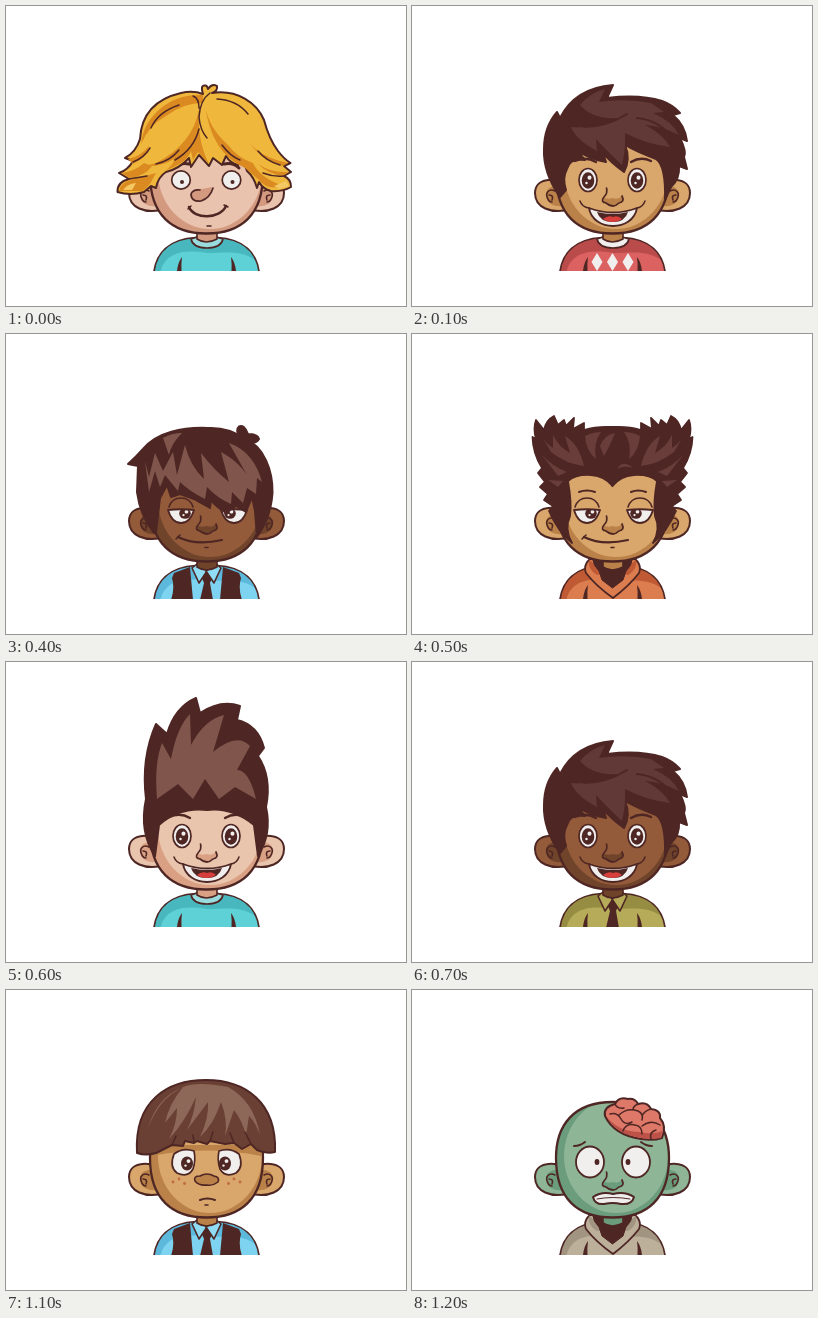
An HTML page for the animation above (1300 ms loop, 400 px wide and 300 px high).

```html
<!DOCTYPE html>
<html lang="en">
<head>
<meta charset="utf-8">
<title>Portraits</title>
<style>
html, body { margin: 0; width: 100%; height: 100%; overflow: hidden; background: #fff; }
svg { display: block; width: 100vw; height: 100vh; }
</style>
</head>
<body>
<svg id="stage" viewBox="0 0 400 300" fill="none" stroke-linejoin="round" stroke-linecap="round"></svg>
<script>
const INK = '#4e2624', WHITE = '#f1efee', STEP = 100;

const fill = (d, color) => `<path d="${d}" fill="${color}"/>`;
const line = (d, width = 1.7, color = INK) => `<path d="${d}" stroke="${color}" stroke-width="${width}"/>`;
const shape = (d, color, width = 2) => `<path d="${d}" fill="${color}" stroke="${INK}" stroke-width="${width}"/>`;
const oval = (x, y, rx, ry, color, width = 0) =>
  `<ellipse cx="${x}" cy="${y}" rx="${rx}" ry="${ry}" fill="${color}" ${width ? `stroke="${INK}" stroke-width="${width}"` : ''}/>`;
const flip = s => `<g transform="translate(401) scale(-1 1)">${s}</g>`;
const pair = s => s + flip(s);
const clip = (id, s) => `<g clip-path="url(#${id})">${s}</g>`;

const HEAD = 'M200.5 112C162 112 144 135 144 168C144 209 166 227.500 200.5 227.500C235 227.500 257 209 257 168C257 135 239 112 200.5 112Z';
const BODY = 'M147.500 270C149 246 164 233 190 231.500H211C237 233 252 246 253.500 270Z';

const skins = {
  pink: ['#e9c3ae', '#d39a80'],
  peach: ['#eac5ad', '#d9a084'],
  tan: ['#d9a76c', '#ba8148'],
  brown: ['#935b39', '#70432b'],
  green: ['#8db596', '#6b9c7c']
};

function head([skin, shade]) {
  const ear = shape('M160 182C146 170 123 171 123 187C123 201 138 209 160 203Z', skin) +
    fill('M150 181C138 177 131 185 135 194Q139 201 150 200Z', shade) +
    line('M143 185C137 182 133 187 135.500 192Q137 196 140 196M137 189Q142 189 140 194', 1.6);
  return pair(ear) + fill(HEAD, shade) +
    clip('head', oval(204, 166, 52, 57, skin)) +
    line(HEAD, 2.3);
}

// Clothes

const arms = pair(fill('M171 265Q172 256 176 251Q175 258 175.500 265Z', INK));
const roundCollar = color => shape('M185 233Q187 242 201 242Q215 242 217 233L210 231Q201 238 191 231Z', color, 1.6);
const collar = color => pair(shape('M191 230L201 237L193 249L186 234Z', color, 1.6));
const necktie = fill('M197 238H204L206 244L204 249L207 266H194L198 249L196 244Z', INK);
const torso = (color, shade) => fill(BODY, color) +
  clip('body', fill('M145 268C148 246 160 230 190 230H212C236 232 249 241 254 258C238 243 222 247 201 247C176 243 158 247 154 268Z', shade)) +
  line(BODY);

const clothes = {
  sweater: () => torso('#5dd1d5', '#49b8be') + arms + roundCollar('#9adcdd'),
  shirt: () => torso('#d8d7e1', '#bcb1d0') + arms + line('M201 239V265', 1.5) + collar('#e6e4ec') +
    [253, 261].map(y => oval(197.5, y, 1.2, 1.2, INK)).join(''),
  hoodie: (color = '#db7d4e', shade = '#bf5a35') => torso(color, shade) + arms +
    shape('M178 225Q171 231 174 239Q184 252 201 264Q217 252 227 239Q230 231 223 225Z', color, 1.8) +
    fill('M177 226Q175 235 185 241L190 240L180 228ZM224 226Q226 235 216 241L211 240L221 228Z', shade) +
    shape('M181 226Q181 231 187 237L190 246L200.5 254L211 246L214 237Q220 231 220 226Z', INK, 1),
  tie: () => torso('#b5ab59', '#968d43') + arms + necktie + collar('#b5ab59'),
  argyle: () => torso('#dc6262', '#b94b4b') + arms +
    [185, 200.5, 216].map(x => fill(`M${x} 247l5.500 9l-5.500 9l-5.500 -9Z`, WHITE)).join('') + roundCollar(WHITE),
  vest: () => torso('#7dd3f0', '#5db9dc') +
    pair(fill('M168 239L184 233L187 266H165Q169 254 166 244Z', INK)) + necktie + collar('#8fdcf4')
};

// Faces

const freckles = pair([[167, 192], [173, 189], [178.500, 193.500]]
  .map(([x, y]) => oval(x, y, 1.4, 1.4, '#bf6a3f')).join(''));
const pupil = (x, y, rx, ry = rx) => oval(x, y, rx, ry, INK) +
  oval(x + 1.5, y - ry * .35, rx * .32, rx * .32, WHITE) + oval(x - 1.5, y + ry * .3, rx * .2, rx * .2, WHITE);
const nose = shade => fill('M191 191Q195 194 201 192Q206 194 210 190Q214 196 207 197Q201 203 194 197Q188 197 191 191Z', shade) +
  line('M194.500 182Q196 187 192 191Q188 196 194 197Q201 203 207 197Q213 196 210 190', 1.7);

const faces = {
  smile: (skin, shade) => pair(line('M168 162Q174 156 183 158', 3)) +
    [175, 225.5].map(x => oval(x, 174, 9.3, 9.1, WHITE, 1.7) + oval(x + 1, 176, 2, 2, INK)).join('') +
    fill('M185 188Q188 182 196 183L206 181Q204 192 195 195Q185 196 185 188Z', shade) +
    line('M207 182Q204 192 195 195Q185 196 185 188Q187 183 194 184', 1.7) +
    line('M183 201C188 213.500 214 213.500 220 200', 2.5) +
    line('M182 203L185 200M218 199L222 201M201 220H205', 1.5),
  laugh: (skin, shade) => fill('M151 166Q201 172 250 166V174Q201 178 151 174Z', shade) +
    pupil(175, 176.5, 5.2, 6.5) + pupil(224, 176.5, 5.2, 6.5) + nose(shade) +
    shape('M178 202Q201 210 224 202C222 225 180 225 178 202Z', INK, 1.8) +
    fill('M181 204Q201 211 221 204Q220 209 216 211Q201 214 186 211Z', WHITE) +
    fill('M191 216Q197 210 201 214Q206 210 211 216Q201 221 191 216Z', '#d8373f') +
    line('M175 203Q178 203 179 200M227 203Q224 203 223 200', 1.5) + freckles,
  smirk: (skin, shade) => [[175, 179], [228, 224]].map(([x, px]) =>
      line(`M${x - 12} 173Q${x - 9} 164 ${x} 164Q${x + 9} 164 ${x + 12} 173`, 1.6) +
      fill(`M${x - 13} 176H${x + 13}Q${x + 9} 189 ${x} 189Q${x - 9} 189 ${x - 13} 176Z`, WHITE) +
      pupil(px, 179.5, 5.8, 5.2) + fill(`M${x - 12} 176Q${x} 168 ${x + 12} 176Z`, skin) +
      line(`M${x - 13} 176Q${x} 174.500 ${x + 13} 176Q${x + 9} 189 ${x} 189Q${x - 9} 189 ${x - 13} 176`, 1.8)).join('') +
    line('M167 158Q175 155 183 158M219 158Q226 155 234 158', 2) + nose(shade) +
    line('M172 203Q190 212 216 206', 2.2) + line('M170 205L174 201M199 213.500H202', 1.6),
  beam: (skin, shade) => [176, 225].map(x => oval(x, 174, 9, 11.5, WHITE, 1.7) + pupil(x, 174.5, 6.3, 8.2)).join('') +
    line('M163 155Q174 150 184 156M219 156Q229 150 239 155', 2.4) + nose(shade) +
    shape('M177 202Q201 211 225 202C221 226 181 226 177 202Z', WHITE, 1.8) +
    fill('M185 206Q201 210 216 206Q213 216 201 216Q188 216 185 206Z', INK) +
    fill('M191 213Q196 209 201 211Q206 209 210 213Q206 216 201 216Q195 216 191 213Z', '#d83f3c') +
    line('M168 195Q170 201 177 202M233 195Q231 201 225 202', 1.5),
  grumpy: (skin, shade) => fill('M151 160H250V172Q225 180 201 177Q175 166 151 174Z', shade) +
    shape('M163 169L189 170Q187 181 177 181Q167 181 163 169Z', WHITE, 1.6) + oval(179, 173, 4.5, 4.5, INK) +
    shape('M214 174L239 169Q238 181 228 181Q219 181 214 174Z', WHITE, 1.6) + oval(226, 175, 4.5, 4, INK) +
    line('M207 178Q208 186 212 190Q216 198 207 198Q203 202 196 199Q188 199 190 193Q193 190 198 191', 1.6) +
    line('M205 208Q211 206 217 207', 2),
  sad: (skin, shade) => fill('M146 155H255V166Q201 155 146 166Z', shade) +
    [[177, 181, -1], [224, 219, 1]].map(([x, px, s]) =>
      shape(`M${x - 11 * s} 161Q${x} 157 ${x + 9 * s} 164Q${x + 14 * s} 177 ${x + 6 * s} 183Q${x - 5 * s} 188 ${x - 10 * s} 179Q${x - 13 * s} 170 ${x - 11 * s} 161Z`, WHITE, 1.7) +
      pupil(px, 173.5, 6, 7)).join('') +
    shape('M189 191Q187 186 194 186Q201 182 208 186Q214 187 212 192Q207 196 201 195Q193 196 189 191Z', shade, 1.6) +
    line('M194 210Q201 207 209 210', 2) + line('M199 215H202', 1.5) + freckles,
  scared: (skin, shade) => [[178, 185], [224, 216]].map(([x, px]) =>
      oval(x, 172, 14, 15.5, WHITE, 1.8) + oval(px, 172, 2.4, 3, INK)).join('') +
    line('M162 156Q168 156 173 152M229 152Q234 156 240 156', 2) + nose(shade) +
    shape('M181 207Q190 201 201 204Q213 201 222 207Q220 215 209 214Q201 212 192 214Q183 215 181 207Z', WHITE, 2) +
    line('M185 209Q201 206 218 209', 1)
};

// Hair

const tuft = color => shape('M234 103Q229 96 233 92.500Q238 90 242 100Q252 100 253 105Q250 111 239 107Z', color);

const hairs = {
  shaggy: (base = '#efb83c', deep = '#da8a20') => shape('M145 180L138 186Q124 190 111.500 186Q111 176 123 173L113 167Q122 164 127 155L119 152Q130 146 134 133Q136 96 175 87Q187 84 197 88Q194 79 199 79.500Q201 79 202 83Q206 77 211 80Q212 85 206 87C231 83 251 97 258 114Q263 133 272 145Q278 153 284.500 157L278 160L285 166L278 170Q285 173 285 181Q276 186 265 185Q257 183 253 176L251 182Q248 171 241 165L237 154L232 159Q224 157 220 150L216 159L207 152L203 160L193 149L185 161L183 152Q173 163 160 166Q152 171 150 182Z', base) +
    fill('M197 89Q172 88 155 102Q137 117 135 138Q144 118 160 110Q177 97 197 97Z', deep) +
    fill('M193 103Q187 138 150 157L139 160Q155 161 168 153Q169 157 160 164Q181 157 185 145L187 154L192 146L203 158Q191 135 193 103Z', deep) +
    fill('M122 153Q134 151 143 140Q141 151 127 158ZM115 167Q128 166 138 157L146 160Q139 170 124 172ZM113 185Q114 177 125 174L150 167L144 178L137 185Z', deep) +
    fill('M199 99Q202 121 222 139Q232 152 247 157Q253 171 277 180Q262 185 253 174L239 162Q205 147 199 99Z', deep) +
    fill('M240 132Q252 151 282 157L277 160Q255 155 240 132ZM252 158Q265 167 282 166L277 170Q262 168 252 158Z', deep) +
    fill('M117 184Q121 178 130 177L126 184ZM268 180L280 175L283 180L274 183Z', '#f4c964') +
    line('M204 87Q194 94 193 111Q194 124 201 132M193 102Q193 92 187 90M211 93Q231 94 242 108M193 123Q188 143 169 154M150 158Q164 155 173 144M127 156Q138 152 144 142M173 99Q152 106 145 122M216 139Q224 150 234 154M252 145Q260 155 274 159M141 170L123 173M257 167Q267 171 278 170', 1.5),
  fringe: (base = '#8b4a2d', light = '#bd7a51') => shape('M148 197C138 184 130 165 131 148L134 136L127 134C130 116 154 94 200 94Q222 93 237 104C258 114 267 138 266.500 158C265 180 258 191 252 200L251 164Q226 170 200 167Q176 169 151 164L150 198Z', base) +
    tuft(base) +
    fill('M139 144L149 124L151 132L163 121L162 136L174 127L180 138L192 121L197 140L209 123L212 136L223 125L228 138L238 130L241 142L251 138L255 154L246 147L247 157L238 146L234 155L228 143L223 155L214 143L210 156L201 145L195 160L188 145L181 155L174 142L168 152L159 140L156 153L149 139Z', light) +
    fill('M189 97Q201 95 216 97L207 101L201 98L196 103Z', light) +
    line('M174 166L172 157M191 167L190 157M210 167L211 158M224 166L222 160M240 165L239 155M151 164L153 145', 1.5),
  wild: (base = INK, light = '#693d39') => {
    const inner = 'M128 99Q132 108 141 114L141 101Q147 113 158 119L153 102Q167 110 172 132Q154 130 139 118ZM173 102Q181 98 189 98Q181 109 184 125Q174 117 173 102ZM130 121Q140 132 155 138L146 142ZM136 146L151 147L146 153Z';
    const side = 'M200.5 93Q185 92 172 96L172 89L161 95L162 84L154 92L152 86L146 91L142 82Q134 86 132 96L124 86Q121 94 124 105L120.500 103Q121 120 130 134L126 139L133 148L128 153L136 160L132 166L141 172L137 177Q146 198 160 209Q152 195 158 182Q160 170 156 147Q164 140 179 141Q193 142 200.5 152Z';
    return pair(shape(side, base, 1.8) + fill(inner, light)) + fill('M198 93H203V150H198Z', base) +
      fill('M203 99Q198 112 192 122L188 112Q192 101 203 99ZM205 135Q211 125 221 134Q212 131 205 135Z', light);
  },
  swept: (base = INK, light = '#613936') => shape('M148 191Q131 167 132 143Q132 121 145 106L148 112Q163 82 201 79L195 92Q228 88 250 95Q261 99 268 107L261 109Q273 119 275 135L268 132Q275 146 272 151L275 163L267 160Q268 173 259 181L253 194Q254 160 244 153Q225 146 213 139Q219 153 212 166Q199 157 191 147L194 156Q176 153 165 144L173 154Q158 151 155 163Q150 172 154 184Z', base) +
    fill('M168 99Q178 87 193 83L187 96Q214 92 239 97L252 106L241 107Q260 115 267 129Q247 119 233 119Q251 128 258 141Q234 138 213 127Q214 142 210 159Q195 145 184 133L185 145Q164 134 159 121Q187 123 208 112Q181 114 168 99Z', light) +
    line('M172 121Q195 121 215 108M225 112Q246 114 259 130', 2),
  messy: (base = INK, light = '#80564c') => shape('M148 199Q134 181 131 158L132 132L122 130Q130 123 137 115C151 98 177 93 202 94Q223 93 239 105C258 112 267 137 266.500 159C265 181 257 194 251 203L249 177L246 163L240 178L230 172L220 179Q209 172 205 166L204 174L188 165L174 160L165 163L161 151L154 164L150 198Z', base) +
    tuft(base) +
    fill('M157 104Q166 99 176 99Q165 110 163 121ZM139 127L143 143L149 119L157 137L167 118L171 141L179 111Q184 132 198 145L195 119Q208 136 223 148L215 118Q237 130 246 150L223 109Q248 118 256 148L251 144L250 160L241 154L237 169L226 158L225 170Q211 164 201 153L199 165Q183 157 174 148L172 157L159 141L154 153L149 137L143 158Z', light),
  bowl: (base = '#694033', light = '#8d6758') => shape('M131 163C128 110 162 90 200 90C239 90 271 112 269 162Q260 164 251 160L245 154L236 159L228 153L219 154L204 151L201 154L191 151L188 153L179 151L177 156L166 155L150 163Q140 166 131 163Z', base) +
    fill('M142 139Q150 108 177 97Q163 114 159 133L171 118Q171 134 163 149Q179 132 190 107Q188 126 181 140L202 112Q203 128 194 147Q208 134 215 112Q222 130 219 146L228 120Q237 132 240 146L243 126Q250 133 254 145Q248 111 222 97Q191 91 177 97Q152 109 142 139Z', light) +
    line('M166 155L170 146M188 152L187 145M204 151L207 142M228 153L224 143M245 154L239 142', 1.5),
  tall: (base = INK, light = '#80564c') => shape('M149 194Q133 170 140 137Q135 96 150 62L161 72Q169 45 190 36L194 51Q215 37 234 44L231 58Q252 63 258 86L252 94Q266 115 260 145Q266 172 252 194L248 163Q226 145 201 148Q173 145 153 163Z', base) +
    fill('M151 137Q148 101 156 81L165 97Q171 65 184 52L185 83Q198 58 218 53L207 90Q231 70 244 84L231 108Q243 108 250 137L229 125L213 137L199 117L187 137L172 122Z', light),
  brain: () => shape('M193 126Q191 117 203 114Q207 106 216 109Q223 108 226 114Q235 111 239 119Q249 120 248 128Q255 136 250 148Q241 151 229 149Q202 145 193 126Z', '#de7868') +
    fill('M195 127Q207 142 228 142Q241 145 250 141L249 148Q240 150 229 148Q203 144 195 127Z', '#bd5348') +
    line('M203 114Q205 119 212 118M207 125Q215 117 226 121Q232 124 230 130M226 114Q221 116 221 120M239 119Q232 121 230 126M198 124Q205 122 209 129Q213 136 220 132M211 141Q214 133 223 135Q230 136 230 144M230 136Q239 129 248 135M239 149Q237 142 244 140', 1.5)
};

function kid(skin, hair, face, outfit, hairColors = [], outfitColors = []) {
  const tones = skins[skin];
  const neck = shape('M191 222V233Q200 239 211 233V222Z', tones[1], 1.6);
  return clip('floor', clothes[outfit](...outfitColors) + neck) +
    head(tones) + faces[face](...tones) + hairs[hair](...hairColors);
}

const chestnut = ['#694033', '#8d6758'];
const cast = [
  kid('pink', 'shaggy', 'smile', 'sweater'),
  kid('tan', 'swept', 'beam', 'argyle'),
  kid('peach', 'bowl', 'smile', 'tie'),
  kid('peach', 'fringe', 'laugh', 'shirt'),
  kid('brown', 'messy', 'smirk', 'vest'),
  kid('tan', 'wild', 'smirk', 'hoodie'),
  kid('peach', 'tall', 'beam', 'sweater'),
  kid('brown', 'swept', 'beam', 'tie'),
  kid('tan', 'fringe', 'laugh', 'sweater', chestnut),
  kid('peach', 'messy', 'grumpy', 'argyle'),
  kid('pink', 'swept', 'smile', 'shirt', chestnut),
  kid('tan', 'bowl', 'sad', 'vest'),
  kid('green', 'brain', 'scared', 'hoodie', [], ['#bdb09b', '#a19581'])
];

const stage = document.getElementById('stage');
stage.innerHTML = `<defs>
  <clipPath id="head"><path d="${HEAD}"/></clipPath>
  <clipPath id="body"><path d="${BODY}"/></clipPath>
  <clipPath id="floor"><path d="M0 0H400V265H0Z"/></clipPath>
</defs>` + cast.map(art => `<g class="kid" display="none">${art}</g>`).join('');
const kids = [...stage.querySelectorAll('.kid')];

function render(ms) {
  const current = Math.floor(ms / STEP) % kids.length;
  kids.forEach((el, i) => el.setAttribute('display', i === current ? 'inline' : 'none'));
}

const start = performance.now();
function tick() {
  render(performance.now() - start);
  requestAnimationFrame(tick);
}
tick();
</script>
</body>
</html>
```
